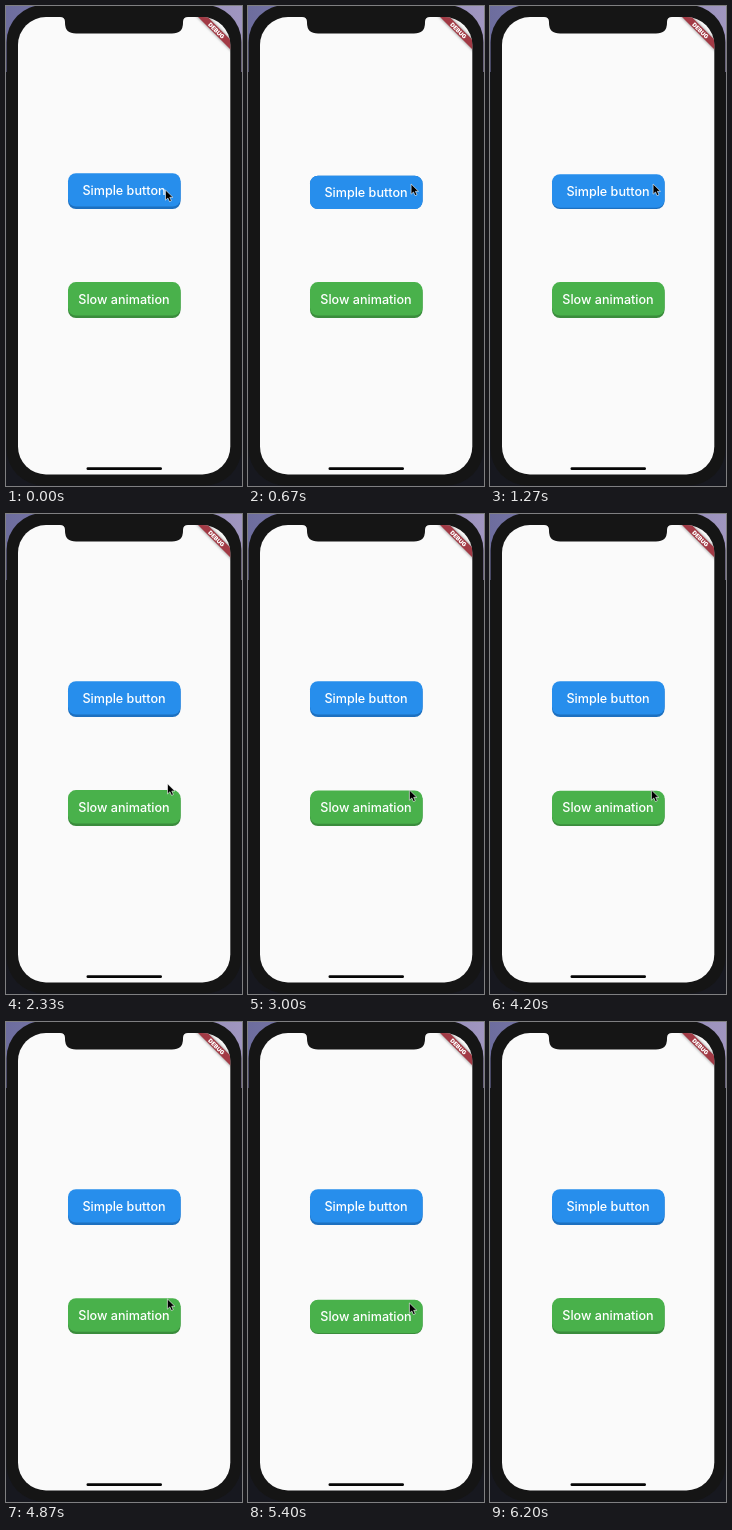
An HTML page for the animation above (6.74 s loop, 236 by 480 pixels).

```html
<!DOCTYPE html>
<html lang="en">
<head>
<meta charset="utf-8">
<title>Press buttons</title>
<style>
  html, body { margin: 0; width: 100%; height: 100%; overflow: hidden; background: #17181f; }
  svg { display: block; width: 236px; height: 480px; }
  text { fill: #fff; text-anchor: middle; font-family: Inter, "Open Sans", sans-serif; }
  .label { font-size: 12.6px; font-weight: 500; }
  .debug { font-size: 5.8px; font-weight: 900; }
</style>
</head>
<body>
<svg viewBox="0 0 236 480">
  <defs>
    <linearGradient id="sky">
      <stop offset="0" stop-color="#6d6d9e"/>
      <stop offset="1" stop-color="#a096c0"/>
    </linearGradient>
    <clipPath id="screen"><rect x="12" y="11" width="212.3" height="457.5" rx="28"/></clipPath>
    <filter id="soft" x="-20%" y="-80%" width="140%" height="260%"><feGaussianBlur stdDeviation="1.4"/></filter>
  </defs>

  <rect width="236" height="480" fill="#17181f"/>
  <rect width="236" height="66" fill="url(#sky)"/>
  <rect x=".6" y="-1" width="234.8" height="480.5" rx="37" fill="#151515"/>

  <g clip-path="url(#screen)">
    <rect width="236" height="480" fill="#fafafa"/>
    <g transform="translate(224 11) rotate(45)">
      <rect x="-28" y="15.8" width="56" height="6.8" fill="#000" opacity=".5" filter="url(#soft)"/>
      <rect x="-28" y="15.8" width="56" height="6.8" fill="#a23a45"/>
      <text class="debug" y="21.3">DEBUG</text>
    </g>
  </g>
  <path d="M54 10V11Q59 11 59 16V17Q59 27.5 70 27.5H166Q177 27.5 177 17V16Q177 11 182 11V10Z" fill="#151515"/>
  <rect x="80.5" y="461.3" width="75.5" height="2.8" rx="1.4" fill="#050505"/>

  <g transform="translate(62 167.2)">
    <rect y="2.5" width="112.6" height="33.4" rx="8" fill="#1d70c0"/>
    <g id="blue">
      <rect width="112.6" height="33.4" rx="8" fill="#278eec"/>
      <text class="label" x="56" y="21.8">Simple button</text>
    </g>
  </g>
  <g transform="translate(62 276.1)">
    <rect y="2.5" width="112.6" height="33.4" rx="8" fill="#3a8c3c"/>
    <g id="green">
      <rect width="112.6" height="33.4" rx="8" fill="#49b14b"/>
      <text class="label" x="56" y="21.6">Slow animation</text>
    </g>
  </g>

  <path id="cursor" d="M0 0V10.2L2.4 8L4 11.6L5.9 10.8L4.3 7.3H7.4Z" fill="#000" stroke="#fff" stroke-width=".6" stroke-linejoin="round"/>
</svg>
<script>
  const LOOP = 6740, STEP = 1000 / 15, DEPTH = 2.5;
  const QUICK = 110, SLOW = 460;
  const part = id => document.getElementById(id);
  const clamp = p => Math.min(1, Math.max(0, p));
  const smooth = p => p * p * (3 - 2 * p);
  const easeOut = p => 1 - (1 - p) ** 3;

  // Sinks at a steady rate; a short tap rises again from the level it reached
  function tap(t, down, up, duration, peak = 1) {
    return clamp(Math.min(peak, (t - down) / duration, peak - (t - up) / duration));
  }

  const progress = (t, start, end, ease = smooth) => ease(clamp((t - start) / (end - start)));
  const move = (id, x, y) => part(id).setAttribute("transform", `translate(${x} ${y})`);

  function draw(now) {
    const t = Math.floor((now % LOOP + 4) / STEP) * STEP;
    move("blue", 0, DEPTH * (tap(t, 553, 953, QUICK) + tap(t, 1220, 1620, QUICK)));
    move("green", 0, DEPTH * (tap(t, 2940, 3860, SLOW) + tap(t, 4840, 5333, SLOW, .78)));

    const nudge = progress(t, 0, 200);
    const travel = progress(t, 1630, 2800, easeOut);
    const settle = progress(t, 4740, 5200);
    const leave = progress(t, 5800, 6133);
    move("cursor",
      159.5 + 3.6 * nudge - 1.7 * travel + 45 * leave,
      184 - 6 * nudge + 98 * travel + 5 * settle - 13 * leave);
    part("cursor").style.visibility = t < 6190 ? "visible" : "hidden";
  }

  const start = performance.now();
  function tick() {
    draw(performance.now() - start);
    requestAnimationFrame(tick);
  }
  tick();
</script>
</body>
</html>
```
